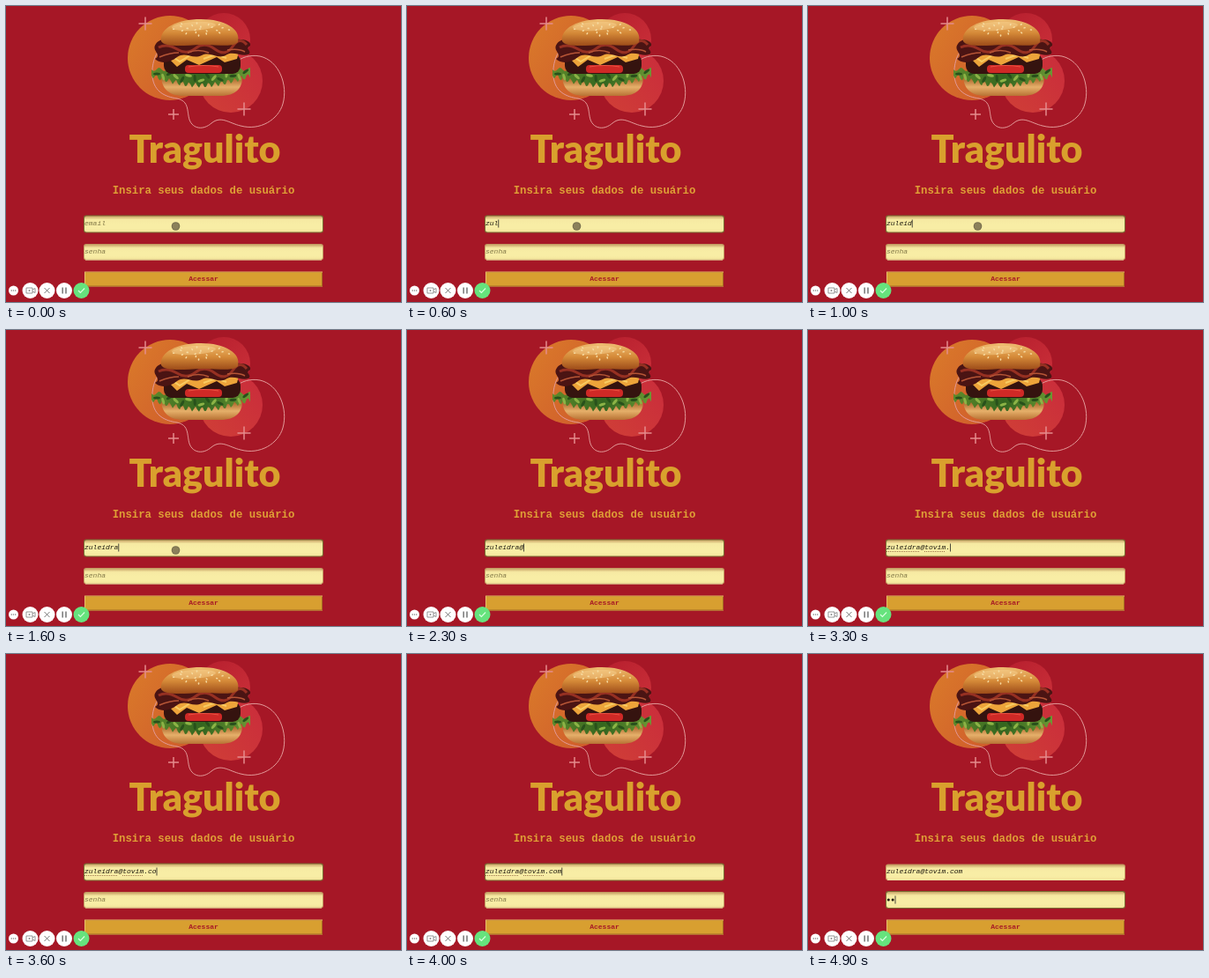
An HTML page with a canvas for the animation above (5 s loop, 448 by 336 pixels).

```html
<!DOCTYPE html>
<html lang="pt-BR">
<head>
<meta charset="utf-8">
<title>Login</title>
<style>
html, body { margin: 0; width: 100%; height: 100%; overflow: hidden; background: #a61726; }
canvas { display: block; width: 448px; height: 336px; }
</style>
</head>
<body>
<canvas id="stage"></canvas>
<script>
const W = 448, H = 336, LOOP = 5000;
const MONO = '"Liberation Mono", "Courier New", monospace';
const EMAIL = 'zuleidra@tovim.com';
const KEYS = [400, 500, 600, 700, 800, 900, 1500, 1600, 2300,
              2600, 2700, 2800, 2900, 3000, 3100, 3500, 3600, 3700];
const DOTS = [4700, 4900];
const FOCUS = 100, TAB = 4500, POINTER_OFF = 2000, BLINK = 500, ADVANCE = 4.8;

const canvas = document.getElementById('stage');
const ctx = canvas.getContext('2d');
const dpr = window.devicePixelRatio || 1;
canvas.width = W * dpr;
canvas.height = H * dpr;
ctx.scale(dpr, dpr);

function disc(x, y, r, fill) {
  ctx.fillStyle = fill;
  ctx.beginPath();
  ctx.arc(x, y, r, 0, Math.PI * 2);
  ctx.fill();
}

function oval(x, y, rx, ry, fill, angle = 0) {
  ctx.fillStyle = fill;
  ctx.beginPath();
  ctx.ellipse(x, y, rx, ry, angle, 0, Math.PI * 2);
  ctx.fill();
}

function shape(d, fill) {
  ctx.fillStyle = fill;
  ctx.fill(new Path2D(d));
}

function line(d, color, width) {
  ctx.strokeStyle = color;
  ctx.lineWidth = width;
  ctx.stroke(new Path2D(d));
}

function box(x, y, w, h, r, fill) {
  ctx.fillStyle = fill;
  ctx.beginPath();
  ctx.roundRect(x, y, w, h, r);
  ctx.fill();
}

function label(str, x, y, font, color, align = 'left') {
  ctx.font = font;
  ctx.fillStyle = color;
  ctx.textAlign = align;
  ctx.fillText(str, x, y);
}

function blend(x0, y0, x1, y1, ...colors) {
  const g = ctx.createLinearGradient(x0, y0, x1, y1);
  colors.forEach((c, i) => g.addColorStop(i / (colors.length - 1), c));
  return g;
}

function plus(x, y, r) {
  line(`M${x - r} ${y}h${2 * r}M${x} ${y - r}v${2 * r}`, '#e58c8d', 1.5);
}

function drawBackdrop() {
  disc(247, 38, 30, blend(230, 10, 275, 60, '#b8202f', '#cb3039'));
  disc(186, 59, 48, blend(140, 30, 230, 90, '#d9782a', '#cf5a2c'));
  disc(255, 85, 36, blend(225, 110, 290, 60, '#cf3d37', '#ca2d3b'));
  line('M181 43C168 52 165 68 166 80C168 98 181 103 194 105C208 108 205 119 208 129' +
       'C212 140 224 141 233 133C244 124 253 133 266 136C288 142 309 129 314 111' +
       'C320 90 310 62 288 57C277 55 267 58 259 65', '#e39a99', 1);
  plus(158, 20, 7.5);
  plus(190, 123, 6);
  plus(270, 117, 7.5);
}

function drawBurger() {
  // lower bun
  shape('M176 81H268C268 93 261 102 243 102H201C184 102 177 93 176 81Z',
        blend(0, 82, 0, 102, '#a9632a', '#e6b06a', '#b87234'));
  // lettuce
  ctx.fillStyle = blend(165, 0, 279, 0, '#5d8a2b', '#34651f', '#6d9a34');
  ctx.beginPath();
  for (let i = 0; i <= 56; i++) {
    const x = 165 + i * 2;
    ctx.lineTo(x, 72 + Math.sin(i * 1.1) * 2);
  }
  for (let i = 56; i >= 0; i--) {
    const x = 165 + i * 2;
    const sag = 11 * Math.sin(Math.PI * i / 56);
    ctx.lineTo(x, 79 + sag + Math.sin(i * 1.7) * 3);
  }
  ctx.fill();
  for (let i = 0; i < 15; i++) {
    oval(171 + i * 7.2, 77 + Math.sin(i * 2.1) * 3 + 5 * Math.sin(Math.PI * i / 14), 4, 1.6,
         i % 2 ? '#8bb346' : '#28511b', i * 1.3);
  }
  // patty, tomato and cheese
  box(179, 54, 87, 23, 9, '#35130f');
  box(203, 67, 42, 9, 4, '#cf2926');
  line('M207 69Q224 66 241 69', '#ec5544', 1.2);
  shape('M181 50L265 48L262 60L248 64L239 58L219 67L205 61L194 69L185 60Z', '#eda43a');
  line('M188 57L197 63L209 56M224 60L238 55L250 59', '#f8cc62', 2);
  // bacon
  shape('M170 43C176 35 186 39 193 40L256 39C265 36 279 39 277 45C270 49 280 51 275 55' +
        'C267 58 257 50 249 56C240 61 232 51 222 56C211 61 204 51 194 58' +
        'C184 66 173 65 169 60C178 55 164 51 170 43Z', '#4b1413');
  line('M173 47Q183 42 194 49T215 48T237 49T257 46T273 44', '#963022', 3);
  line('M174 58Q186 53 196 53M206 53Q218 48 230 53M251 50Q264 48 271 52', '#b65536', 1.5);
  // upper bun
  shape('M176 40C174 25 194 15 221 15C248 15 267 26 263 41C258 47 244 44 222 44' +
        'C200 45 180 47 176 40Z', blend(0, 15, 0, 46, '#efbd72', '#d58a38', '#994717'));
  oval(213, 23, 25, 5, 'rgba(255,225,165,.35)', -0.06);
  for (let i = 0; i < 22; i++) {
    const a = i * 2.4, r = Math.sqrt(i / 22);
    oval(220 + 34 * r * Math.cos(a), 26 + 8 * r * Math.sin(a), 1.3, 0.8, '#f6dba2', a);
  }
}

function drawField(y, focused) {
  const h = focused ? 20 : 18.5;
  const top = focused ? y - 1 : y;
  box(88, top, 272, h, 3, focused ? '#786b32' : '#c49a62');
  box(89, top + 1, 270, h - 2, 2.5,
      blend(0, top, 0, top + h, '#bd9358', '#f6e9a2', '#f8eda5', '#f8eda5', '#f3e49a'));
  if (!focused) line(`M90 ${y + 18}H358`, '#eee0a4', 1);
}

function drawButton() {
  box(89, 301.5, 270, 17, 0, '#e9bd6b');
  box(90, 302.5, 269, 16, 0, '#a66b22');
  box(90, 302.5, 268, 15, 0, '#d89f30');
  label('Acessar', 224, 312, `bold 8px ${MONO}`, '#a61726', 'center');
}

function drawToolbar() {
  const y = 323;
  disc(8.5, y, 5.5, '#fff');
  for (const x of [6.3, 8.5, 10.7]) disc(x, y, 0.7, '#777');
  for (const x of [27.5, 46.5, 66]) disc(x, y, 9, '#fff');
  disc(85.5, y, 9, '#66e37d');
  line('M23 320h7v6h-7zM30 322l3-1.5v5l-3-1.5', '#8b8b8b', 0.9);
  disc(26.5, y, 1, '#8b8b8b');
  line('M43.5 320l6 6M49.5 320l-6 6', '#777', 1);
  line('M64.2 319.5v7M68 319.5v7', '#777', 1.5);
  line('M82 323l2.4 2.5l4.7-5', '#d9ffe0', 1.2);
}

function drawCaret(x, y, since) {
  if (Math.floor(since / BLINK) % 2 === 0) box(x, y - 4.5, 0.8, 9, 0, '#222');
}

function typed(times, t) {
  return times.filter(k => k <= t).length;
}

function drawForm(t) {
  const onEmail = t < TAB;
  drawField(238.5, onEmail);
  drawField(270, !onEmail);

  const n = typed(KEYS, t);
  const font = `italic 8px ${MONO}`;
  if (n) label(EMAIL.slice(0, n), 89, 249, font, '#1c180e');
  else label('email', 89, 249, font, '#817747');

  if (n > 14 && onEmail) {
    ctx.setLineDash([1, 1]);
    line('M89 251.5h38M132 251.5h24', '#8a5835', 0.8);
    ctx.setLineDash([]);
  }

  const d = typed(DOTS, t);
  if (d) for (let i = 0; i < d; i++) disc(91.3 + i * ADVANCE, 279, 1.5, '#1c180e');
  else label('senha', 89, 281, font, '#817747');

  if (onEmail && t >= FOCUS) {
    drawCaret(89 + n * ADVANCE, 247, t - (n ? KEYS[n - 1] : FOCUS));
  } else if (!onEmail) {
    drawCaret(89 + d * ADVANCE, 279, t - (d ? DOTS[d - 1] : TAB));
  }
}

function draw(t) {
  ctx.fillStyle = '#a61726';
  ctx.fillRect(0, 0, W, H);
  drawBackdrop();
  drawBurger();
  label('Tragulito', 225.5, 177.5, '900 43px Lato, sans-serif', '#d9a02d', 'center');
  label('Insira seus dados de usuário', 224, 213, `bold 12.3px ${MONO}`, '#dfa036', 'center');
  drawForm(t);
  drawButton();
  drawToolbar();
  if (t < POINTER_OFF) {
    disc(192.5, 250, 4.8, '#766d4d');
    disc(192.5, 250, 3.8, '#8b805a');
  }
}

const start = performance.now();
function tick() {
  const t = (performance.now() - start) % LOOP;
  draw(Math.floor(t / 100) * 100);
  requestAnimationFrame(tick);
}
tick();
</script>
</body>
</html>
```
